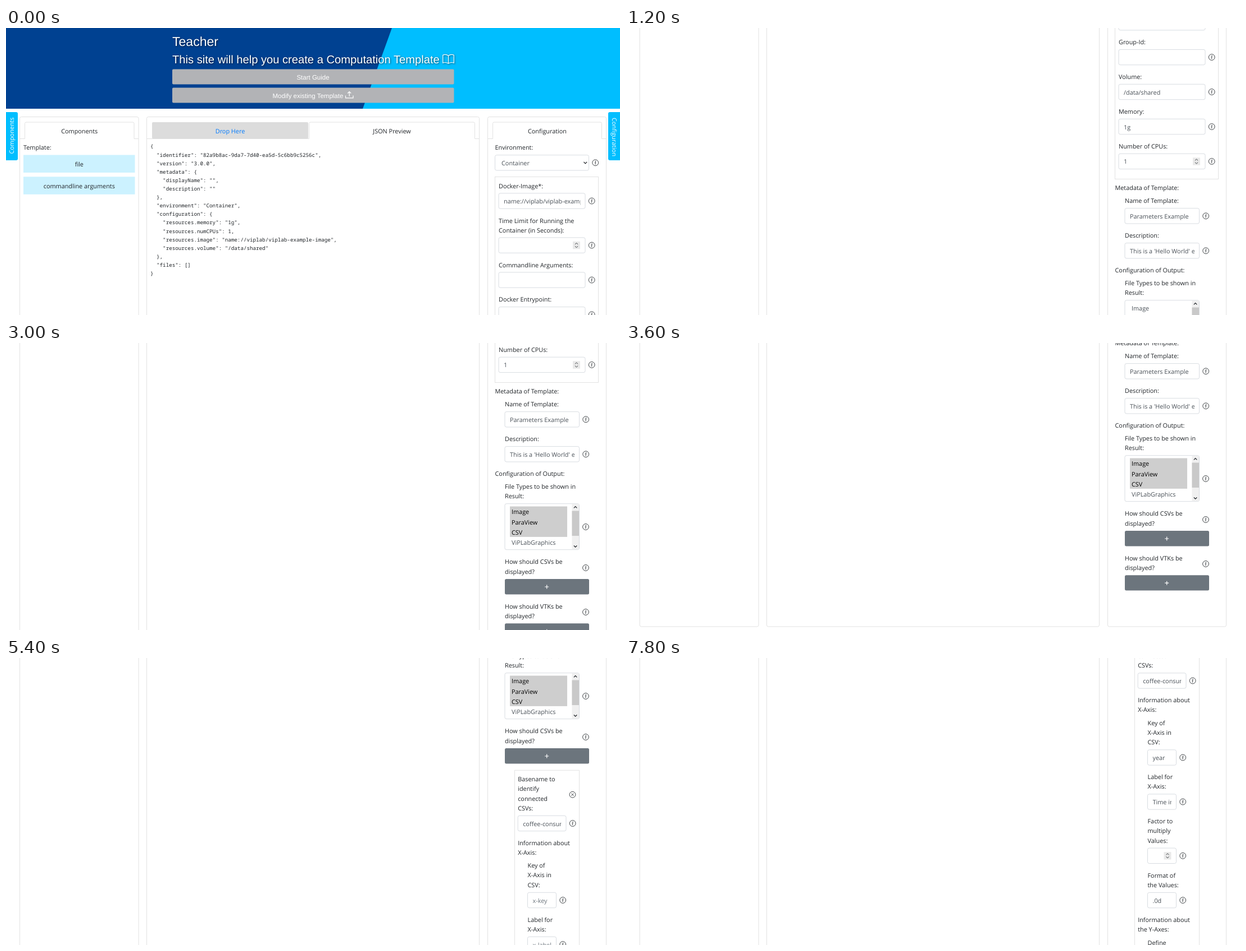
Animation of 1093x512 px, one loop 8 s. Source, as an HTML page:

```html
<!DOCTYPE html>
<html lang="en">
<head>
<meta charset="utf-8">
<title>Template editor</title>
<style>
html, body { margin: 0; width: 100%; height: 100%; overflow: hidden; background: #fff; }
svg { display: block; }
text { font: 10.85px "Open Sans", "Noto Sans", sans-serif; fill: #212529; white-space: pre; text-rendering: geometricPrecision; }
.mid { text-anchor: middle; }
.value { fill: #495057; }
.hint { fill: #6c757d; }
.white { fill: #fff; }
.link { fill: #007bff; }
.black { fill: #000; }
.code { font: 9.22px "Noto Sans Mono", monospace; }
.arial { font: 11.52px "Liberation Sans", Arial, sans-serif; }
.h1 { font-size: 23.04px; }
.h2 { font-size: 20.16px; }
.shadow { filter: drop-shadow(1.4px 1.4px 1.5px rgba(0,0,0,.6)); }
.card { fill: none; stroke: #dfdfdf; stroke-width: .9; }
.box { fill: #fff; stroke: #ced4da; stroke-width: .8; }
.icon { fill: none; stroke: #212529; stroke-width: .85; }
.thick { stroke-width: 1.3; }
.pale { stroke: #fff; stroke-width: 1.2; }
</style>
</head>
<body>
<svg id="stage" width="1093" height="512"></svg>
<script>
const STEP = 600, LOOP = 8000, LINE = 17.28;
const scrolls = [0, 168, 708, 770, 907, 907, 993, 993, 1167, 1167, 1421.5, 1421.5, 1421.5, 1421.5];

const json = `{
  "identifier": "82a9b8ac-9da7-7d40-ea5d-5c6bb9c5256c",
  "version": "3.0.0",
  "metadata": {
    "displayName": "",
    "description": ""
  },
  "environment": "Container",
  "configuration": {
    "resources.memory": "1g",
    "resources.numCPUs": 1,
    "resources.image": "name://viplab/viplab-example-image",
    "resources.volume": "/data/shared"
  },
  "files": []
}`;

// y is the vertical middle of the capitals
const text = (x, y, s, cls = '') => `<text x="${x}" y="${y + 4}" class="${cls}">${s}</text>`;
const label = (x, y, ...lines) => lines.map((s, i) => text(x, y + i * LINE, s)).join('');
const rect = (x, y, w, h, attrs, r = 0) => `<rect x="${x}" y="${y}" width="${w}" height="${h}" rx="${r}" ${attrs}/>`;
const path = (d, cls = '') => `<path d="${d}" class="icon ${cls}"/>`;
const chevron = (x, y, w, h, cls) => path(`M${x - w} ${y - h / 2}l${w} ${h}l${w} ${-h}`, cls);
const ring = (x, y) => `<circle cx="${x}" cy="${y}" r="5.4" class="icon"/>`;

const info = (x, y) => ring(x, y) + `<circle cx="${x + .4}" cy="${y - 2.5}" r=".75" fill="#212529"/>` +
  path(`M${x - 1.2} ${y - .7}l1.6 -.3l-.8 3.5q.2 .5 1 0`);
const cross = (x, y) => ring(x, y) + path(`M${x - 2.2} ${y - 2.2}l4.4 4.4m0 -4.4l-4.4 4.4`);

function field(x, w, y, value = '', cls = 'value') {
  return rect(x, y - 13.7, w, 27.4, 'class="box"', 2.9) + info(x + w + 11.7, y) +
    `<svg x="${x + 9}" y="${y - 13}" width="${w - 17.6}" height="26">${text(0, 13.5, value, cls)}</svg>`;
}
const spinner = (x, y) => rect(x - 6.5, y - 6.7, 13, 13.4, 'fill="#e9e9e9"') +
  chevron(x, y - 2.8, 2.6, -2.4) + chevron(x, y + 2.8, 2.6, 2.4);
const plusButton = y => rect(888, y, 150, 27.4, 'fill="#6c757d"', 2.5) +
  path(`M959.2 ${y + 14}h7m-3.5 -3.5v7`, 'pale');

function banner() {
  const bar = y => rect(296, y, 501.5, 27, 'fill="#b2b3b6"', 2);
  return rect(0, 0, 1093, 144, 'fill="#00beff"') + '<path d="M0 0H687L635 144H0z" fill="#004191"/>' +
    '<g class="shadow">' + text(296, 28, 'Teacher', 'arial white h1') +
    text(296, 58.5, 'This site will help you create a Computation Template', 'arial white h2') +
    path('M787.5 49.5q-4.5 -3.6 -9.8 -1.2v14q5.300 -2 9.800 1q4.500 -3 9.800 -1v-14q-5.300 -2.400 -9.800 1.200v13.800', 'pale thick') + '</g>' +
    bar(73.500) + text(546.5, 87.5, 'Start Guide', 'arial white mid') +
    bar(106.5) + text(474.5, 120.5, 'Modify existing Template', 'arial white') +
    path('M604.5 120.5v4.300h13.500v-4.300M611.2 122v-8.500m-3 3l3 -3l3 3', 'pale');
}

function sideTab(x, turn, name) {
  return rect(x - 13, 150, 34 - (turn > 0 ? -13 : 0), 86, 'fill="#00beff"', 3) +
    `<g transform="translate(${turn < 0 ? 10 : 1082.5} ${turn < 0 ? 192 : 194.5}) rotate(${turn})">${text(0, 0, name, 'white mid')}</g>`;
}

function card(x, w, bottom) {
  return rect(x, 158.5, w, bottom - 158.5, 'class="card"', 2.9);
}
function tab(left, from, to, right, name) {
  return `<path class="card" d="M${left} 197.500H${from}V170.500q0 -2.500 2.500 -2.500H${to - 2.5}q2.500 0 2.500 2.500V197.500H${right}"/>` +
    text((from + to) / 2, 184, name, 'mid');
}

function components() {
  const part = (y, name) => rect(31, y, 198.5, 31.5, 'fill="#ccf2ff"') + text(130.3, y + 16.5, name, 'mid');
  return tab(24.5, 33.5, 228, 236, 'Components') + label(31, 213, 'Template:') +
    part(226.5, 'file') + part(265.3, 'commandline arguments');
}

function preview() {
  return tab(250.5, 539.5, 834.5, 842.5, 'JSON Preview') +
    rect(260, 168, 278, 29.5, 'fill="#dcdcdc"', 2) + text(399, 184, 'Drop Here', 'link mid') +
    json.split('\n').map((s, i) => text(257, 210.4 + i * 15.12, s, 'code')).join('');
}

function container() {
  const row = (y, name, value) => label(877, y, name) + field(877, 154, y + 27, value);
  return rect(870.5, 265.5, 184, 712, 'class="card"') +
    row(281.5, 'Docker-Image*:', 'name://viplab/viplab-example-image') +
    label(877, 343.5, 'Time Limit for Running the', 'Container (in Seconds):') +
    field(877, 154, 387.6) + spinner(1015.5, 387.6) +
    row(422.5, 'Commandline Arguments:') + row(484.3, 'Docker Entrypoint:') +
    label(877, 546.3, 'RegEx-Pattern for Intermediate', 'Result Files:') +
    label(894, 587, 'How many Patterns', 'should there be?') + info(1042.7, 614) +
    rect(894, 617.5, 120, 27, 'class="box"', 2.9) +
    '<path class="card" d="M937.500 622v18M970.500 622v18"/>' +
    path('M912.500 631h7.500M988 631h7.500m-3.750 -3.750v7.500', 'thick') + text(954, 631.3, '0', 'value mid') +
    row(671.2, 'User-Id:') + row(733.1, 'Group-Id:') +
    row(795, 'Volume:', '/data/shared') + row(857, 'Memory:', '1g') +
    row(918.9, 'Number of CPUs:', '1') + spinner(1015.5, 946);
}

function fileTypes(selected) {
  const names = ['Image', 'ParaView', 'CSV', 'ViPLabGraphics'];
  return rect(888, 1193.7, 132.5, 82, 'class="box"', 2.9) +
    rect(1007.5, 1194.2, 12.5, 81, 'fill="#f0f0f0"') + rect(1007.5, 1206.5, 12.5, 44.5, 'fill="#c9c9c9"') +
    chevron(1013.6, 1200, 2.7, -2.7, 'thick') + chevron(1013.6, 1269.8, 2.7, 2.7, 'thick') +
    (selected ? rect(897, 1198.5, 102, 54.4, 'fill="#cecece"') : '') +
    names.map((s, i) => text(900, 1208.4 + i * 18.1, s, selected && i < 3 ? 'black' : 'value')).join('') +
    info(1032, 1235);
}

function csvPanel(n) {
  const small = (y, value, cls) => field(928.5, 51, y, value, cls);
  const typed = (from, value, hint) => n >= from ? [value, 'value'] : [hint, 'hint'];
  return '<path class="card" d="M905.500 2100V1367.300H1020.500V2100"/>' +
    label(911.2, 1383, 'Basename to', 'identify', 'connected', 'CSVs:') + cross(1008.5, 1410.7) +
    field(911.2, 85.8, 1462, ...typed(9, 'coffee-consumption', 'csv-basename')) +
    label(911.2, 1496.6, 'Information about', 'X-Axis:') +
    label(928.5, 1537, 'Key of', 'X-Axis in', 'CSV:') + small(1599, ...typed(11, 'year', 'x-key')) +
    label(928.5, 1633.5, 'Label for', 'X-Axis:') + small(1678, ...typed(12, 'Time in years', 'x-label')) +
    label(928.5, 1712.6, 'Factor to', 'multiply', 'Values:') + small(1774.3) + spinner(964, 1774.3) +
    label(928.5, 1809, 'Format of', 'the Values:') + small(1853.6, ...typed(13, '.0d', '')) +
    label(911.2, 1888.5, 'Information about', 'the Y-Axes:') + label(928.5, 1929, 'Define');
}

function configuration(n) {
  return tab(857.5, 866.5, 1060.5, 1068.5, 'Configuration') + label(870.5, 213, 'Environment:') +
    rect(870.5, 226.7, 167, 27.3, 'class="box"', 2.9) + text(882, 241, 'Container', 'value') +
    chevron(1031.3, 240.4, 2.8, 3, 'thick') + info(1049.2, 240.3) + container() +
    label(870.5, 993, 'Metadata of Template:') +
    label(888, 1016, 'Name of Template:') + field(888, 132.5, 1043.3, 'Parameters Example') +
    label(888, 1078, 'Description:') + field(888, 132.5, 1105.3, "This is a 'Hello World' example") +
    label(870.5, 1140, 'Configuration of Output:') +
    label(888, 1163, 'File Types to be shown in', 'Result:') + fileTypes(n >= 5) +
    label(888, 1297.3, 'How should CSVs be', 'displayed?') + info(1032, 1308) + plusButton(1328) +
    (n >= 7 ? csvPanel(n) : label(888, 1376.5, 'How should VTKs be', 'displayed?') + info(1032, 1387) + plusButton(1407.2));
}

function render(n) {
  const bottom = n >= 7 ? 2100 : 1499;
  stage.innerHTML = `<g transform="translate(0 ${-scrolls[n]})">` + banner() +
    card(24.5, 211.5, bottom) + card(250.5, 592, bottom) + card(857.5, 211, bottom) +
    components() + preview() + configuration(n) +
    sideTab(0, -90, 'Components') + sideTab(1085, 90, 'Configuration') + '</g>';
}

const stage = document.getElementById('stage');
let shown = -1;
function tick() {
  const n = Math.floor(performance.now() % LOOP / STEP);
  if (n !== shown) render(shown = n);
  requestAnimationFrame(tick);
}
tick();
</script>
</body>
</html>
```
